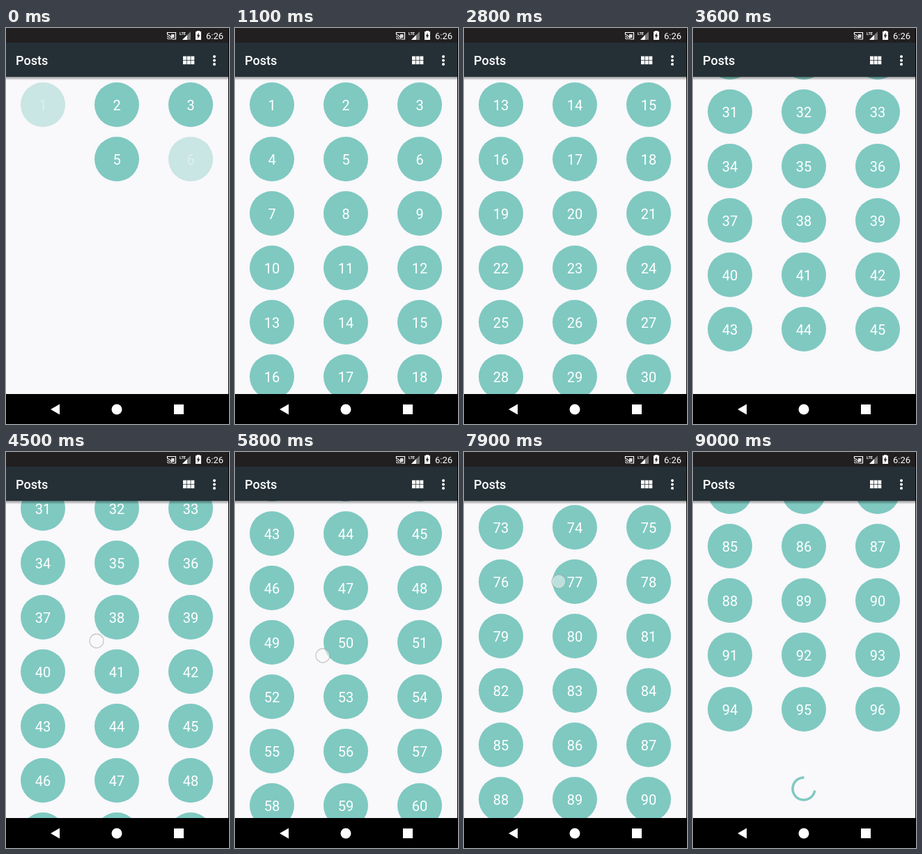
Animation, 320 px wide and 568 px high, one loop 9100 ms. Source, as an HTML page with a canvas:

```html
<!DOCTYPE html>
<html lang="en">
<head>
<meta charset="utf-8">
<title>Posts</title>
<style>
html, body { margin: 0; width: 100%; height: 100%; overflow: hidden; background: #000; }
canvas { display: block; }
</style>
</head>
<body>
<canvas id="stage" width="320" height="568"></canvas>
<script>
const ctx = document.getElementById('stage').getContext('2d');
const LOOP = 9100, STEP = 100;
const TEAL = '#7fc9c1', PAPER = '#f9f8fb', BAR = '#253036';
const LIST = { top: 70, bottom: 525, columns: [53, 159, 265], firstRow: 110, pitch: 78 };

// [time, scroll offset]
const SCROLL = [
  [0, 0], [1700, 0], [1900, 234], [2400, 234], [2800, 312], [2900, 312],
  [3200, 600], [3700, 780], [4400, 780], [4500, 809], [4650, 900], [5200, 1062],
  [5700, 1062], [5800, 1085], [6000, 1230], [6350, 1404], [7000, 1404],
  [7200, 1560], [7600, 1700], [7750, 1700], [7950, 1930], [8400, 2159], [LOOP, 2159]
];

// y is the finger height for a scroll offset of zero
const TOUCHES = [
  { from: 1700, to: 2000, x: 173, y: 415, fill: 0.6 },
  { from: 2900, to: 3200, x: 140, y: 730, fill: 0.5 },
  { from: 4400, to: 4600, x: 130, y: 1080, fill: 0.5 },
  { from: 5700, to: 5900, x: 126, y: 1377, fill: 0.5 },
  { from: 7000, to: 7200, x: 132, y: 1780, fill: 0.5 },
  { from: 7750, to: 7950, x: 136, y: 2060, fill: 0.5 }
];

const LOADS = [
  { from: 1900, to: 2200 },
  { from: 3750, to: 4150 },
  { from: 6350, to: 6500 },
  { from: 8400, to: LOOP }
];

const clamp = v => Math.max(0, Math.min(1, v));
const smooth = v => { v = clamp(v); return v * v * (3 - 2 * v); };

function slope(i) {
  if (i < 1 || i >= SCROLL.length - 1) return 0;
  const rate = j => (SCROLL[j + 1][1] - SCROLL[j][1]) / (SCROLL[j + 1][0] - SCROLL[j][0]);
  const a = rate(i - 1), b = rate(i);
  return a * b > 0 ? 2 * a * b / (a + b) : 0;
}

// Monotone cubic through the scroll knots
function scrollAt(t) {
  let i = 0;
  while (i < SCROLL.length - 2 && t >= SCROLL[i + 1][0]) i++;
  const [t0, s0] = SCROLL[i], [t1, s1] = SCROLL[i + 1];
  const d = t1 - t0, u = (t - t0) / d, k = smooth(u);
  return s0 + (s1 - s0) * k
    + d * (slope(i) * u * (1 - u) * (1 - u) - slope(i + 1) * u * u * (1 - u));
}

function birth(n) {
  if (n > 96) return Infinity;
  if (n === 70) return 6785;
  if (n > 69) return 6450;
  if (n > 45) return 4100 + (n - 46) * 15;
  if (n > 23) return 2100 + (n - 24) * 30;
  if (n > 6) return (n - 6) * 60;
  if (n === 4) return 0;
  return n === 1 || n === 6 ? -120 : -400;
}

function disc(x, y, r, color) {
  ctx.fillStyle = color;
  ctx.beginPath();
  ctx.arc(x, y, r, 0, Math.PI * 2);
  ctx.fill();
}

function shape(points, color) {
  ctx.fillStyle = color;
  ctx.beginPath();
  points.forEach(([x, y]) => ctx.lineTo(x, y));
  ctx.fill();
}

function rect(x, y, w, h, color) {
  ctx.fillStyle = color;
  ctx.fillRect(x, y, w, h);
}

function label(text, x, y, font, align = 'left') {
  ctx.font = font + ' Roboto, sans-serif';
  ctx.textAlign = align;
  ctx.fillStyle = '#fff';
  ctx.fillText(text, x, y);
}

function drawItems(t, scroll) {
  const first = Math.max(0, Math.floor(scroll / LIST.pitch) - 1);
  for (let row = first; row < first + 9; row++) {
    const y = Math.round(LIST.firstRow + row * LIST.pitch - scroll);
    LIST.columns.forEach((x, col) => {
      const n = row * 3 + col + 1;
      const alpha = clamp((t - birth(n)) / 300);
      if (!alpha) return;
      ctx.globalAlpha = alpha;
      disc(x, y, 32, TEAL);
      label(n, x, y + 8, '20px', 'center');
    });
  }
  ctx.globalAlpha = 1;
}

function drawGlow(age) {
  const level = age < 100 ? clamp((age + 50) / 150) : 1 - (age - 100) / 420;
  if (age < 0 || level <= 0) return;
  const radius = 185 * 185 / (36 * level);
  disc(185, LIST.bottom - 45 * level + radius, radius, 'rgba(38,50,56,0.13)');
}

function drawSpinner(age) {
  const rise = 1 - clamp(age / 200);
  const tail = (-90 + 0.165 * age) * Math.PI / 180;
  const sweep = (15 + 255 * smooth(age / 667)) * Math.PI / 180;
  ctx.strokeStyle = TEAL;
  ctx.lineWidth = 3.5;
  ctx.beginPath();
  ctx.arc(159, 483 + 42 * rise * rise, 16, tail, tail + sweep);
  ctx.stroke();
}

function drawTouch(touch, t, scroll) {
  if (t < touch.from || t > touch.to) return;
  disc(touch.x, touch.y - scroll, 10, `rgba(250,250,250,${touch.fill})`);
  ctx.strokeStyle = 'rgba(150,155,158,0.5)';
  ctx.lineWidth = 1.3;
  ctx.stroke();
}

function drawStatusBar() {
  rect(0, 0, 320, 21, '#211f20');
  ctx.strokeStyle = '#fff';
  ctx.lineWidth = 1.2;
  ctx.beginPath();
  ctx.moveTo(231.5, 9);
  ctx.lineTo(231.5, 6.5);
  ctx.lineTo(243.5, 6.5);
  ctx.lineTo(243.5, 16);
  ctx.lineTo(239, 16);
  ctx.stroke();
  [2, 4.5, 7].forEach(r => {
    ctx.beginPath();
    ctx.arc(231, 16.5, r, -Math.PI / 2, 0);
    ctx.stroke();
  });
  rect(237, 9, 4.5, 5, '#ddd');
  label('LTE', 249, 10, 'bold 5.5px');
  shape([[253, 17], [265, 17], [265, 5]], '#777');
  shape([[253, 17], [260, 17], [260, 10]], '#fff');
  rect(272, 5, 8, 12, '#fff');
  rect(274, 4, 4, 1, '#fff');
  shape([[276.7, 6.5], [273.7, 11.7], [275.5, 11.7], [275.2, 15.5], [278.3, 10.3], [276.5, 10.3]], '#211f20');
  label('6:26', 312, 15.5, '13px', 'right');
}

function drawToolbar() {
  rect(0, 21, 320, 49, BAR);
  const shade = ctx.createLinearGradient(0, 70, 0, 75);
  shade.addColorStop(0, 'rgba(0,0,0,0.4)');
  shade.addColorStop(1, 'rgba(0,0,0,0)');
  rect(0, 70, 320, 5, shade);
  label('Posts', 14, 53, '500 18px');
  for (let i = 0; i < 6; i++) {
    rect(254 + (i % 3) * 5.7, 40.5 + Math.floor(i / 3) * 6.2, 4.9, 5.4, '#fff');
  }
  [41, 46.5, 52].forEach(y => disc(299, y, 2, '#fff'));
}

function drawNavigation() {
  rect(0, LIST.bottom, 320, 43, '#000');
  shape([[64, 547], [77, 539.5], [77, 554.5]], '#fff');
  disc(159, 547, 7.5, '#fff');
  rect(241, 540, 14, 14, '#fff');
}

function draw(t) {
  const scroll = scrollAt(t);
  rect(0, 0, 320, 568, PAPER);
  drawItems(t, scroll);
  LOADS.forEach(load => {
    drawGlow(t - load.from);
    if (t >= load.from && t < load.to) drawSpinner(t - load.from);
  });
  TOUCHES.forEach(touch => drawTouch(touch, t, scroll));
  drawToolbar();
  drawStatusBar();
  drawNavigation();
  rect(319, 0, 1, 568, '#000');
}

const start = performance.now();
function tick() {
  const t = (performance.now() - start) % LOOP;
  draw(Math.floor(t / STEP) * STEP);
  requestAnimationFrame(tick);
}
tick();
</script>
</body>
</html>
```
